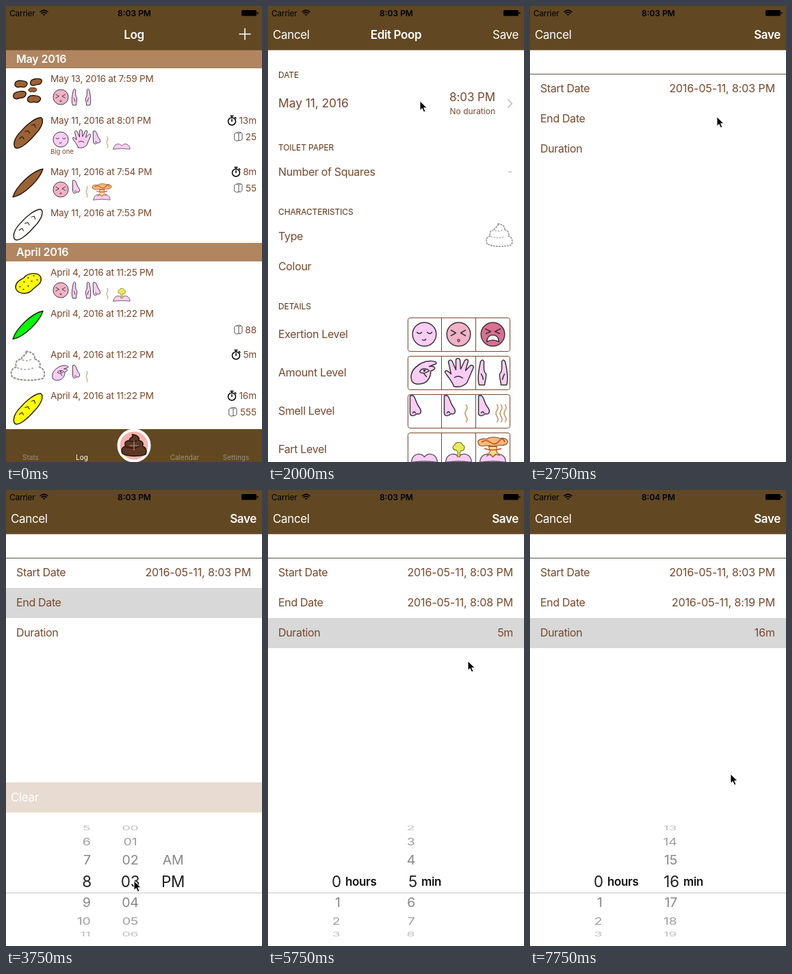
An HTML page for the animation above (8000 ms loop, 374 by 666 pixels).

```html
<!DOCTYPE html>
<html lang="en">
<head>
<meta charset="utf-8">
<title>Log</title>
<style>
html, body { margin: 0; width: 100%; height: 100%; overflow: hidden; background: #fff; }
svg { display: block; width: 374px; height: 666px; font-family: Inter, "Noto Sans", sans-serif; }
</style>
</head>
<body>
<svg id="stage" viewBox="0 0 374 666"></svg>
<script>
const BAR = '#614822', TAN = '#b08560', INK = '#79482b', HEAD = '#5b3212';
const PINK = '#facdf5', LINE = '#3a3438';
const LOOP = 8000, STEP = 250;

// ---- helpers ----
const at = (x, y, body, s = 1, r = 0) =>
  `<g transform="translate(${x} ${y}) rotate(${r}) scale(${s})">${body}</g>`;
const path = (d, fill = 'none', stroke = LINE, w = 1.5, more = '') =>
  `<path d="${d}" fill="${fill}" stroke="${stroke}" stroke-width="${w}" stroke-linejoin="round" stroke-linecap="round" ${more}/>`;
const rect = (x, y, w, h, fill, more = '') =>
  `<rect x="${x}" y="${y}" width="${w}" height="${h}" fill="${fill}" ${more}/>`;
const dot = (x, y, r, fill, more = '') => `<circle cx="${x}" cy="${y}" r="${r}" fill="${fill}" ${more}/>`;
const text = (x, y, str, size = 16, fill = INK, anchor = 'start', weight = 400, gap = /\d{2}/.test(str) ? -0.006 : -0.021) =>
  `<text x="${x}" y="${y}" font-size="${size}" fill="${fill}" text-anchor="${anchor}" font-weight="${weight}" letter-spacing="${gap}em">${str}</text>`;
const fade = (o, body) => `<g opacity="${o}">${body}</g>`;

// Linear value between [time, value...] keys
function key(t, keys, i = 1) {
  const n = keys.findIndex(k => k[0] > t);
  if (n < 0) return keys[keys.length - 1][i];
  if (n === 0) return keys[0][i];
  const a = keys[n - 1], b = keys[n];
  return a[i] + (b[i] - a[i]) * (t - a[0]) / (b[0] - a[0]);
}

// ---- icons, drawn around 0,0 ----
const skin = d => path(d, PINK);
const FACE = [
  ['#facdf5', path('M-11-3q4 4 7 0M4-3q4 4 7 0M-3 8q3 2 5-1')],
  ['#f0b2c6', path('M-11-6l7 4-7 4M10-6l-7 4 7 4') + dot(0, 9, 1.6, 'none', `stroke="${LINE}" stroke-width="1.2"`)],
  ['#dd6e90', path('M-11-8l8 4-7 3M11-8l-8 4 7 3') + path('M-9 11Q-8 1 0 1t9 10Q0 6-9 11Z', '#fff')]
];
const face = n => dot(0, 0, 17.3, FACE[n][0], `stroke="${LINE}" stroke-width="1.5"`) + FACE[n][1];
const side = skin('M-20 18C-23 9-21-3-18-16q3-5 5 0C-13-8-14-2-10 2-9 7-12 13-12 18Z') + path('M-17 2q2 3 3 8');
const HAND = [
  skin('M-18 13C-23 0-13-9-4-14 6-19 20-17 17-13L7-9C14-10 18-7 13-4L9-2C10 4 6 12 0 15-6 17-14 18-18 13Z') +
    path('M-7-1C-5-7 3-7 7-3 2 1-3 2-7-1ZM-1 1l4 5') + dot(0, -3, 1.7, LINE),
  skin('M-7 20C-10 11-17 5-20-1q1-5 9 3L-15-16q3-5 6 0L-4-4-4-19q3-4 6 0L3-5 9-18q4-3 5 1L10-3 18-11q5 0 3 5L12 15Q3 23-7 20Z') +
    path('M-6 7q6-4 12 1'),
  side + `<g transform="scale(-1 1)">${side}</g>`
];
const nose = skin('M-21-22C-13-26-14-14-8-6-3 0-5 6-11 4-15 8-21 8-21 3Z') + path('M-17 3q2-4 4 0');
const wave = x => path(`M${x}-9q3 4 0 8t0 9 0 8`, 'none', '#c49a68', 1.6);
const SMELL = [nose, nose + wave(11), nose + wave(6) + wave(12) + wave(18)];
const seat = path('M-19 19C-18 6-6 4 0 11 6 4 18 6 19 19Q0 16-19 19Z', PINK, '#5a4a55', 1.3);
const FART = [
  seat,
  seat + path('M-2 11Q0 5-3 1C-9 2-10-5-6-6-4-12 5-11 6-6 11-4 8 3 3 2Q1 6 2 11Z', '#e8ec58', '#7d7a1c', 1.2),
  seat + path('M-9 10L-4 3-6-4H6L5 3 10 9 4 7 0 11-4 7Z', '#f9dc80', '#a8602c', 1.2) +
    path('M-21-8C-25-15-14-16-9-15-4-19 6-18 10-16 20-18 25-11 20-8 16-4 9-7 4-5-2-3-8-7-12-5-16-4-20-5-21-8Z', '#f5ba78', '#8a4a2c', 1.2) +
    path('M-16-11q7-4 13 1t12-2 8 1M-12-1q12 4 24 0', 'none', '#d8432c', 1.6)
];
const SWIRL = 'M-18 12C-21 5-17 2-13 1-16-6-10-8-7-8-8-13 1-12-3-17 7-16 9-11 7-8 14-7 15-2 13 1 20 3 20 11 17 14 8 17-12 17-18 12Z';
const FOLDS = 'M-12 2Q0 6 8 1M-6-7Q0-5 4-8';
const swirl = path(SWIRL, 'none', '#97938f', 1.7, 'stroke-dasharray="1.4 2.6"') +
  path(FOLDS, 'none', '#a5a19d', 1.3, 'stroke-dasharray="1.2 3"');
const stick = fill => path('M-29 2C-28-5-18-9-6-9 8-10 24-8 29-2 29 5 17 9 4 9-10 10-28 9-29 2Z', fill, '#1c140e', 1.4) +
  path('M-15-3l5 1-1 4M-2-4l4 2-1 4M11-4l4 2-2 4', 'none', '#1c140e', 1);
const lens = fill => path('M-30 0C-16-8 16-9 30 0 16 8-16 9-30 0Z', fill, '#1c140e', 1.4);
const lumps = [[22, 114, 1], [44, 111, .95], [39, 122.5, .65], [20, 130, 1.05], [41, 136, 1.05]].map(([x, y, s], i) =>
  at(x, y, path('M-9 1C-9-4-4-5 1-5 6-5 9-4 9-1 8 3 5 5 0 4-4 6-9 5-9 1Z', '#9c6233', '#1c140e', 1.3), s, i % 2 ? -6 : 6)).join('');
const blob = path('M-19 6C-19-3-11-5-7-8 0-17 16-16 18-8 20 1 10 4 5 10-3 18-18 15-19 6Z', '#ff0', '#1c140e', 1.4) +
  path('M-13 5h1M-7-2h1M-1-8h1M7-11h1M12-5h1M4-3h1M-1 4h1M-8 9h1', 'none', '#1c140e', 1.3);
const watch = dot(0, 1, 5.5, '#fff', 'stroke="#000" stroke-width="1.5"') +
  path('M-2-7h4M0-7v3M4.5-5l1.5 1.5M0 1V-2', 'none', '#000', 1.5);
const roll = path('M-5-4Q-2-7 1-4V6Q-2 8-5 5ZM1-4Q5-7 6-4V4Q4 7 1 6M-2-5Q1-8 4-5.5', '#fff', '#555', 1);

// ---- screens ----
const wifi = path('M50 8.5q5.5-4.6 11 0M52 10.6q3.5-3 7 0', 'none', '#000', 1.6) + path('M54 12.3l1.5 1.7 1.5-1.7Z', '#000', '#000', .5);
const status = t => text(5, 14.5, 'Carrier', 12, '#000') + wifi +
  text(187.5, 14.5, t < 7250 ? '8:03 PM' : '8:04 PM', 12, '#000', 'middle', 600, 0) +
  rect(344, 6, 22, 8.5, '#000', 'rx="1.5"') + rect(366.8, 8.7, 1.6, 3.2, '#000', 'rx=".8"');
const bar = rect(0, 0, 374, 64.5, BAR);

const ROWS = [
  [111, 'May 13, 2016 at 7:59 PM', '', ''],
  [171.5, 'May 11, 2016 at 8:01 PM', '13m', '25'],
  [246.5, 'May 11, 2016 at 7:54 PM', '8m', '55'],
  [306.5, 'May 11, 2016 at 7:53 PM', '', ''],
  [393.5, 'April 4, 2016 at 11:25 PM', '', ''],
  [453.5, 'April 4, 2016 at 11:22 PM', '', '88'],
  [513.5, 'April 4, 2016 at 11:22 PM', '5m', ''],
  [573.5, 'April 4, 2016 at 11:22 PM', '16m', '555']
];
const MARKS = [
  [80, 133, face(1)], [110, 133, HAND[2]],
  [80, 195, face(0)], [110, 194, HAND[1]], [141, 197, SMELL[1]], [169, 197, FART[0]],
  [80, 268, face(1)], [111, 269, SMELL[1]], [140, 271, FART[2]],
  [80, 415, face(1)], [110, 415, HAND[2]], [141, 418, SMELL[1]], [169, 419, FART[1]],
  [80, 536, HAND[0]], [111, 539, SMELL[1]]
];
const band = (y, str) => rect(0, y, 374, 27, TAN) + text(15, y + 19, str, 16, '#fff', 'start', 600, -0.01);

const log = rect(0, 0, 374, 666, '#fff') + band(64, 'May 2016') + band(346, 'April 2016') + bar +
  text(187, 48, 'Log', 17, '#fff', 'middle', 600) + path('M341 41h16M349 33v16', 'none', '#fff', 1.6) +
  ROWS.map(([y, date, time, paper]) => text(65, y, date, 13.6, INK, 'start', 400, -0.016) +
    (time && text(366, y, time, 13.6, INK, 'end') + at(time.length > 2 ? 330 : 336, y - 4, watch)) +
    (paper && text(366, y + 24, paper, 13.6, INK, 'end') + at(paper.length > 2 ? 331 : 339, y + 19, roll))).join('') +
  MARKS.map(([x, y, icon]) => at(x, y, icon, .64)).join('') + text(65, 216, 'Big one', 9.5, INK, 'start', 400, 0) +
  lumps + at(32.5, 185, stick('#9c6233'), 1, -45) + at(32, 258.5, lens('#9c6233'), 1, -43) +
  at(32, 319, stick('#fff'), 1, -45) + at(33, 405, blob) + at(32, 466, lens('#0f0'), 1, -43) +
  at(32, 526, swirl, 1.28) + at(32, 588, stick('#ff0'), 1, -45) +
  rect(0, 618, 374, 48, BAR) +
  [[36, 'Stats'], [111, 'Log'], [261, 'Calendar'], [336, 'Settings']].map(([x, s]) =>
    text(x, 663, s, 10, s === 'Log' ? '#fff' : '#98908a', 'middle', 400, 0)).join('') +
  dot(187, 642, 22.5, '#f6b3ae', 'stroke="#fff" stroke-width="4"') +
  at(187, 642, path(SWIRL, '#5c3623', '#24140e', 1.6) + path(FOLDS, 'none', '#24140e', 1.4) +
    path('M-7 0h14M0-7v14', 'none', '#a78c80', 1.2), .95);

const GRID = [['Exertion', [0, 1, 2].map(face)], ['Amount', HAND], ['Smell', SMELL], ['Fart', FART]];
const form = picked => (picked ? rect(0, 113, 374, 57, '#d6d6d6') : '') +
  [[104.5, 'DATE'], [210.5, 'TOILET PAPER'], [304.5, 'CHARACTERISTICS'], [442.5, 'DETAILS']].map(([y, s]) =>
    text(15, y, s, 12, HEAD, 'start', 400, -0.01)).join('') +
  text(15, 148, 'May 11, 2016', 17.5) + text(332, 139, '8:03 PM', 17, INK, 'end') +
  text(332, 157.5, 'No duration', 12, INK, 'end', 400, 0) + path('M351 137l5.5 5.5-5.5 5.5', 'none', '#c7c7cc', 1.8) +
  text(15, 247.5, 'Number of Squares') + text(357, 247, '-', 16, '#c0b8b2', 'end') +
  text(15, 341.5, 'Type') + text(15, 385.5, 'Colour') + at(338, 335, swirl) +
  GRID.map(([name, icons], i) => {
    const y = 455.5 + 56 * i;
    return text(15, y + 29.5, name + ' Level') +
      rect(204.5, y, 149, 49, '#fff', `rx="3" stroke="${INK}"`) +
      path(`M253.5 ${y}v49M303.5 ${y}v49`, 'none', INK, 1) +
      icons.map((icon, n) => at(228.5 + 50 * n, y + 24, icon)).join('');
  }).join('');

const nav = (title, bold) => bar + text(7, 48, 'Cancel', 17, '#fff') +
  text(187, 48, title, 17, '#fff', 'middle', 600) + text(366, 48, 'Save', 17, '#fff', 'end', bold ? 600 : 400);

// Rows of a picker column lie on a cylinder
function wheel(x, pos, label, anchor, lo, hi, slant = 0) {
  let out = '';
  for (let n = Math.max(lo, Math.ceil(pos - 3.4)); n <= Math.min(hi, pos + 3.4); n++) {
    const a = (n - pos) * .361, near = Math.abs(n - pos) < .5;
    const grey = Math.round(120 + 100 * (1 - Math.cos(a)) + 20 * Math.abs(Math.sin(a)));
    const y = 571.5 + 87.6 * Math.sin(a), end = near ? x : x - slant * (.7 + Math.abs(Math.sin(a)) * .4);
    out += `<g transform="translate(${end} ${y}) scale(1 ${Math.cos(a)})">` +
      text(0, near ? 8 : 7, label(n), near ? 22.5 : 19.5, near ? '#222' : `rgb(${grey},${grey},${grey})`, anchor, 400, -0.01) + '</g>';
  }
  return out;
}

const CURSOR = [
  [750, 190, 634], [1000, 190, 634], [1250, 193, 600], [1750, 217, 190], [2000, 222, 139], [2250, 222, 142],
  [2500, 305, 194], [2750, 273, 162], [3000, 270, 166], [3500, 192, 548], [3750, 187, 571], [4000, 187, 548],
  [4250, 187, 520], [4500, 187, 575], [5000, 187, 520], [5250, 190, 510], [5500, 268, 215], [5750, 292, 250],
  [6000, 218, 590], [6250, 216, 550], [6500, 214, 500], [6750, 214, 590], [7000, 214, 540], [7250, 216, 500],
  [7500, 240, 470], [7750, 293, 415]
];
const END = [[3750, 3], [4000, 3.7], [4250, 5], [4500, 5], [5000, 7.4], [5250, 8]];
const MINUTES = [[6000, 5], [6250, 6.3], [6500, 9], [6750, 11], [7000, 13.4], [7250, 15.4], [7500, 16]];
const two = n => String(n).padStart(2, '0');

function dates(t) {
  const spin = key(t, END), mins = key(t, MINUTES);
  const timing = t >= 5750, set = t >= 4250;
  const span = Math.round(timing ? mins : spin - 3);
  const rowY = t < 3000 ? 0 : timing ? 187 : 143;
  let out = (rowY ? rect(0, rowY, 374, 44, '#d8d8d8') : '') + rect(0, 99, 374, 1, '#5c5148') +
    text(15, 126, 'Start Date') + text(358, 126, '2016-05-11, 8:03 PM', 16, INK, 'end') +
    text(15, 170, 'End Date') + text(15, 214, 'Duration');
  if (set) out += text(358, 170, `2016-05-11, 8:${two(3 + span)} PM`, 16, INK, 'end') + text(358, 214, span + 'm', 16, INK, 'end');
  if (rowY) {
    const lift = key(t, [[3000, 110], [3250, 0]]);
    const columns = timing
      ? wheel(107, 0, n => n, 'end', 0, 23, 1.5) + wheel(218, mins, n => n, 'end', 0, 59, 3.5) +
        text(113, 578, 'hours', 17, '#111', 'start', 600) + text(224, 578, 'min', 17, '#111', 'start', 600)
      : fade(set ? 1 : .29, rect(0, 427, 374, 44, TAN)) + text(7, 455, 'Clear', 17, '#fff') +
        wheel(125, 8, n => n, 'end', 1, 12, 1.5) + wheel(181.5, spin, two, 'middle', 0, 59) +
        wheel(244, 1, n => n ? 'PM' : 'AM', 'middle', 0, 1);
    out += at(0, lift, rect(0, 588, 374, 1, '#c4c4c4') + columns);
  }
  return out;
}

const cursor = t => t < 750 ? '' : at(key(t, CURSOR, 1), key(t, CURSOR, 2),
  path('M0 0V13.5L3.2 10.6 5.6 16 8 15 5.7 9.8H10Z', '#000', '#fff', 1));

function scene(t) {
  if (t < 2250) {
    const y = key(t, [[500, 666], [750, 420], [1000, 12], [1250, 0]]);
    return (y ? log : '') + at(0, y, rect(0, 0, 374, 666, '#fff') + form(false) + nav('Edit Poop', false));
  }
  const p = key(t, [[2000, 0], [2250, .4], [2500, .994], [2750, 1]]);
  const page = at(374 * (1 - p), 0, dates(t));
  if (p === 1) return page + nav('', true);
  return at(-112 * p, 0, form(true)) + page + rect(0, 64, 374, 602, '#000', `opacity="${.1 * p}"`) +
    nav(p < .5 ? 'Edit Poop' : '', p > .5);
}

const stage = document.getElementById('stage');
let shown = -1;
function frame(now) {
  const t = Math.floor(now % LOOP / STEP) * STEP;
  if (t !== shown) stage.innerHTML = scene(t) + status(t) + cursor(t);
  shown = t;
  requestAnimationFrame(frame);
}
requestAnimationFrame(frame);
</script>
</body>
</html>
```
